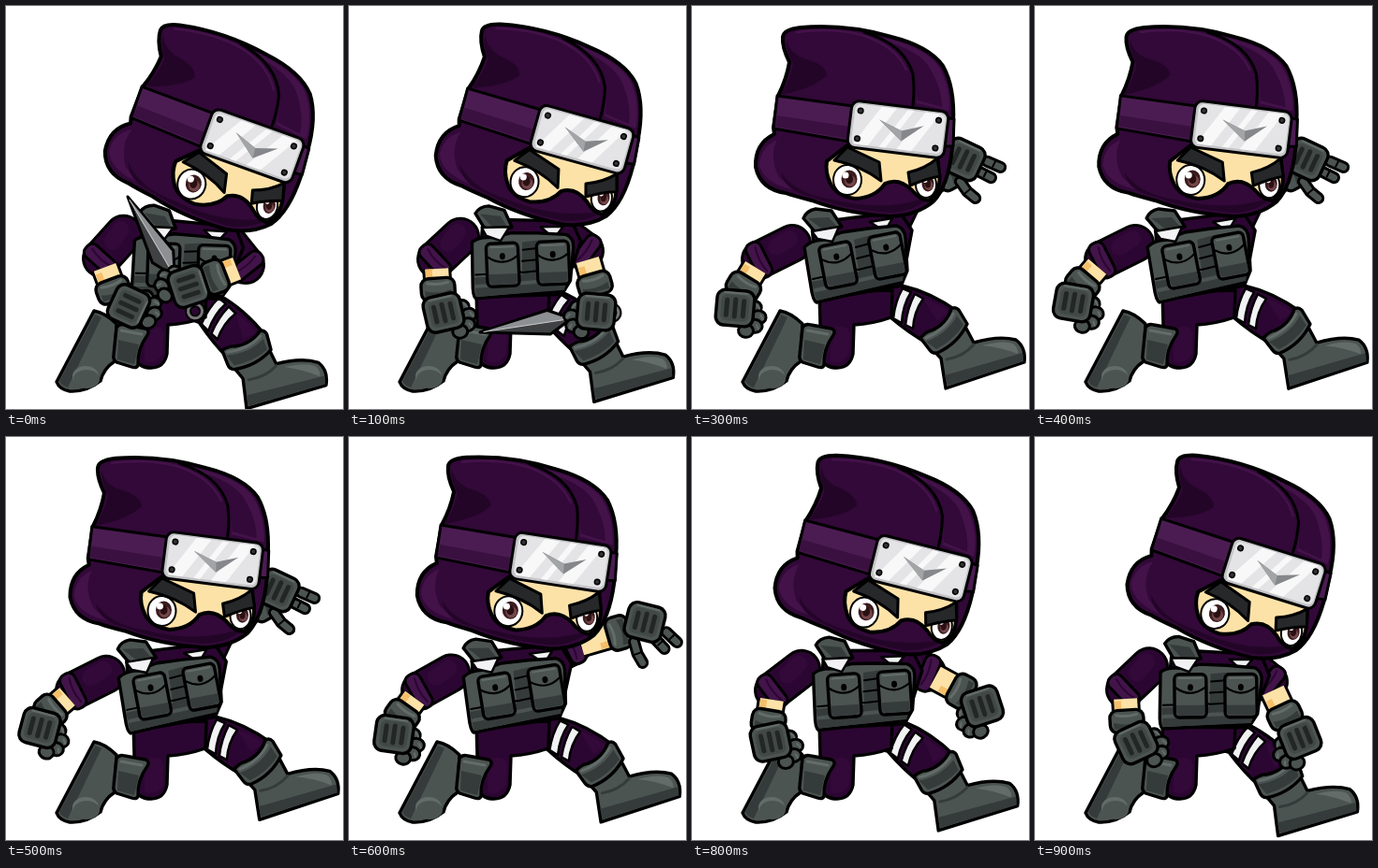
Animation, 360 px wide and 431 px high, one loop 1000 ms. Source, as an HTML page:

```html
<!DOCTYPE html>
<html lang="en">
<head>
<meta charset="utf-8">
<title>Ninja</title>
<style>
html, body { margin: 0; width: 100%; height: 100%; overflow: hidden; background: #fff; }
svg { display: block; width: 360px; height: 431px; }
</style>
</head>
<body>
<svg id="stage" viewBox="0 0 360 431"></svg>
<script>
const C = {
  hood: '#320938', deep: '#230528', lit: '#431249', band: '#4b1c52',
  cloth: '#2c0632', roll: '#42144a', skin: '#fde2a8',
  gray: '#4c5452', dark: '#353b3a', pale: '#636c69', white: '#f2f2f4'
};
const STEP = 100, HIP = '162 332';

// lean: degrees; arms: elbow, cuff, hand, pad angle, finger angle
const poses = [
  { lean: 12.8, near: [102, 270, 114, 302, 131, 321, 115, -20], far: [256, 277, 225, 289, 195, 300, 72, 38], knife: [130, 204, 59.5] },
  { lean: 8.5, near: [93, 271, 95, 301, 101, 328, -13, -10], far: [252, 262, 262, 296, 264, 327, 5, 5], knife: [140, 349, -8.5] },
  { lean: 3.7, near: [80, 271, 76, 302, 72, 331, -3, -3], far: [246, 238, 289, 244, 318, 254, 15, -100], knife: [294, 368, -78] },
  { lean: 0, near: [73, 271, 56, 299, 46, 323, 5, 6], far: [226, 205, 270, 180, 290, 164, 25, -40], open: 1 },
  { lean: .1, near: [73, 271, 52, 296, 41, 317, 10, 11], far: [226, 205, 270, 180, 290, 164, 25, -40], open: 1 },
  { lean: .2, near: [73, 271, 49, 292, 36, 311, 15, 16], far: [226, 205, 270, 180, 290, 164, 25, -40], open: 1 },
  { lean: 1.7, near: [76, 271, 58, 296, 48, 318, 8, 10], far: [238, 224, 286, 210, 316, 198, 14, -20], open: 1 },
  { lean: 3.7, near: [80, 271, 67, 299, 60, 322, 2, 4], far: [246, 233, 285, 233, 320, 230, 3, 0], open: 1 },
  { lean: 7.1, near: [87, 271, 82, 302, 84, 326, -12, -6], far: [251, 252, 286, 271, 310, 288, -18, -28] },
  { lean: 10.4, near: [96, 270, 98, 302, 108, 327, -25, -15], far: [250, 262, 266, 296, 283, 322, -22, -25] }
];

const shape = (d, fill, w = 3.4) =>
  `<path d="${d}" fill="${fill}" stroke="#000" stroke-width="${w}" stroke-linejoin="round"/>`;
const flat = (d, fill) => `<path d="${d}" fill="${fill}"/>`;
const line = (d, color, w, cap = 'round') =>
  `<path d="${d}" fill="none" stroke="${color}" stroke-width="${w}" stroke-linecap="${cap}"/>`;
const tube = (d, fill, w) => line(d, '#000', w + 6) + line(d, fill, w);
const oval = (x, y, rx, ry, fill, w = 0) =>
  `<ellipse cx="${x}" cy="${y}" rx="${rx}" ry="${ry}" fill="${fill}" stroke="#000" stroke-width="${w}"/>`;
const box = (x, y, w, h, r, fill, s = 3.4) =>
  `<rect x="${x}" y="${y}" width="${w}" height="${h}" rx="${r}" fill="${fill}" stroke="#000" stroke-width="${s}"/>`;
const group = (t, s) => `<g transform="${t}">${s}</g>`;
const angle = (x1, y1, x2, y2) => Math.atan2(y2 - y1, x2 - x1) * 180 / Math.PI;

function turn(x, y, deg) {
  const a = deg * Math.PI / 180, dx = x - 162, dy = y - 332;
  return [162 + dx * Math.cos(a) - dy * Math.sin(a), 332 + dx * Math.sin(a) + dy * Math.cos(a)];
}

function farLeg(k) {
  const boot =
    shape('M258 368L292 343L301 360Q328 352 346 357Q357 365 355 381L271 409L266 377Z', C.gray) +
    flat('M270 395L353 371L354 380L273 406Z', C.dark) +
    flat('M310 363Q332 357 343 361Q349 366 348 372Q330 365 310 363Z', C.pale) +
    line('M272 378Q290 375 301 362', C.dark, 3);
  const thigh =
    shape('M186 299L224 299Q255 306 284 327L252 361Q232 350 212 333L180 330Z', C.cloth) +
    flat('M246 312Q262 317 275 327L262 337Q254 324 246 312Z', C.hood) +
    shape('M225 302L234 306Q225 320 224 339L215 334Q217 316 225 302Z', C.white, 2.5) +
    shape('M238 308L247 313Q237 327 236 345L228 341Q230 323 238 308Z', C.white, 2.5) +
    shape('M244 355Q250 348 256 347Q272 340 277 324Q281 321 285 325L294 340Q284 361 262 371Q257 372 254 368Z', C.gray) +
    flat('M250 359Q273 350 283 331L290 341Q280 357 261 367Z', C.dark) +
    line('M250 355Q271 346 279 329', C.pale, 3);
  return group(`translate(${-13 * k} ${23 * k}) rotate(${2 * k} 310 380)`, boot) +
    group(`rotate(${16 * k} 190 315)`, thigh);
}

const nearLeg =
  shape('M94 326Q106 328 118 340L116 380Q104 388 101 401Q86 413 68 412Q57 410 54 402Z', C.gray) +
  flat('M95 330L102 333L66 408Q59 406 57 401Z', C.dark) +
  oval(85, 396, 14, 11, C.pale) + oval(86, 399, 14, 10, C.gray) +
  shape('M136 306L214 304L213 333Q193 340 173 341L172 372Q169 387 155 387Q142 387 138 377Z', C.cloth) +
  flat('M148 346Q164 338 169 350L168 372Q160 384 148 380Z', C.hood) +
  shape('M118 344Q121 339 127 341L149 345Q154 347 151 352Q140 367 141 384Q140 388 134 386L118 381Q114 378 115 373Z', C.gray) +
  flat('M120 357L142 362L137 383L119 378Z', C.dark) +
  line('M123 347L145 351', C.pale, 3);

const pocket = (t) => group(t,
  box(-17, -23, 34, 46, 5, C.gray) + flat('M-15 10H15V18Q14 21 10 21H-10Q-14 21 -15 18Z', C.dark) +
  line('M-16 -9Q-8 -3 0 -3Q8 -3 16 -9', '#000', 2.2) +
  line('M-12 -19H12', C.pale, 2) + oval(0, -9, 3, 3.6, '#000'));

const torso =
  shape('M128 232L222 220L235 240L224 299L134 315Z', C.cloth) +
  shape('M190 231L214 227L206 241Z', C.white, 2.5) +
  shape('M120 258Q126 251 140 250L160 242L188 238L218 235Q227 237 228 248L230 283L225 295L133 317Q129 315 127 300Z', C.gray) +
  flat('M128 295L228 274L225 294L133 315Z', C.dark) +
  line('M132 304L224 283', C.gray, 4) +
  line('M129 292L228 271', '#000', 2) +
  flat('M173 250L191 245L195 285L179 290Z', C.dark) +
  line('M175 258L190 254M176 270L192 266M178 282L194 278', '#000', 2) +
  pocket('translate(156 277) rotate(-11)') + pocket('translate(209 267) rotate(-11)') +
  shape('M119 227Q122 219 132 217L149 219L160 236L142 244L130 240Z', C.gray) +
  flat('M124 227L146 226L154 235L142 241Z', C.dark) +
  shape('M128 241L157 236L150 252L134 249Z', C.white, 2.5);

const hat =
  shape('M97 33Q98 25 116 23Q165 19 213 33Q253 43 268 64Q281 87 279 125L278 152Q274 192 258 209Q240 224 212 225Q165 222 128 208Q108 203 100 200Q73 196 68 172Q67 147 88 137L87 130L92 96Q101 78 104 60Q96 44 97 33Z', C.hood, 4) +
  flat('M101 36Q104 50 119 56Q143 62 144 74Q130 88 95 95Q106 76 108 62Q100 48 101 36Z', C.deep) +
  flat('M193 31Q248 42 263 64Q276 85 275 112L240 104Q243 64 193 31Z', C.lit) +
  flat('M197 35Q246 47 256 70Q267 90 267 108L241 101Q240 64 197 35Z', C.hood) +
  line('M184 28Q227 41 236 73Q238 90 236 106', '#000', 3) +
  line('M112 28Q150 23 181 31Q217 42 229 68', C.lit, 2.5) +
  flat('M72 170Q73 151 91 143Q82 162 93 183Q104 194 116 198Q77 192 72 170Z', C.lit) +
  flat('M95 178Q112 202 150 207Q210 222 258 202Q238 220 212 221Q160 217 128 204Q99 198 95 178Z', C.deep) +
  shape('M91 96L172 107L168 145L87 131Z', C.band, 3) +
  flat('M91 117L168 129L166 142L89 129Z', '#3a1040') +
  shape('M270 119L280 121L279 150L268 150Z', C.band, 3);

const face =
  shape('M144 166L166 149L262 160L264 178Q267 198 253 208Q243 207 235 197Q221 183 206 190Q196 205 174 206Q154 203 148 190Q142 178 144 166Z', C.skin, 4) +
  oval(166, 186, 15, 16, '#fff', 2) + oval(250, 191, 11, 14, '#fff', 2) +
  oval(168, 185, 8.5, 9.5, '#3a1c1e') + oval(169, 187, 6, 6, '#74464a') + oval(168, 185, 4, 5, '#2a1012') +
  oval(164, 181, 3.5, 3.5, '#fff') +
  oval(252, 190, 6.5, 8.5, '#3a1c1e') + oval(253, 192, 4.5, 5, '#74464a') + oval(252, 190, 3, 4.5, '#2a1012') +
  oval(249, 186, 2.5, 3, '#fff') +
  shape('M152 165L166 151L200 167L202 187Q181 171 152 165Z', '#26282a', 3) +
  shape('M231 178Q249 174 262 163L265 182Q252 184 233 192Z', '#26282a', 3);

const plate = group('translate(220 132) rotate(7)',
  box(-52, -25, 104, 50, 8, '#c4c4c8', 3) + box(-48, -22, 97, 43, 6, '#e4e4e6', 0) +
  flat('M-20 -22H-4L-30 21H-46ZM8 -22H15L-11 21H-18ZM27 -22H43L17 21H1Z', '#f8f8f9') +
  flat('M-21 -8L4 1L27 -7L5 12Z', '#85878a') + flat('M-21 -8L4 1L5 12Z', '#a2a4a6') +
  [[-42, -15], [42, -15], [-42, 15], [42, 15]].map(p => oval(...p, 2.8, 2.8, '#333', 1.5)).join(''));

const head = hat + face + plate;

function upperArm(sx, sy, ex, ey) {
  const a = angle(sx, sy, ex, ey);
  return tube(`M${sx} ${sy}L${ex} ${ey}`, C.cloth, 36) +
    line(`M${sx - 3} ${sy - 5}L${(sx + ex) / 2} ${(sy + ey) / 2 - 5}`, C.hood, 18) +
    group(`translate(${ex} ${ey}) rotate(${a})`,
      box(-7, -20, 17, 40, 7, C.roll, 3) + line('M-1 -14Q3 0 -1 14', C.cloth, 2));
}

function fingers(open, side) {
  if (open) return ['M-18 16L-19 29L-17 40', 'M4 20L10 34', 'M18 18L25 32']
    .map(d => tube(d, C.gray, 7)).join('') + line('M-23 29H-15M5 28L12 25M19 26L26 23', '#000', 2);
  return group(`scale(${side} 1)`,
    [[20, -3], [26, 7], [23, 17], [14, 23]].map(p => oval(...p, 8, 7, C.gray, 3)).join('') +
    line('M23 -6L26 -2M28 5L31 9M25 16L27 20', C.pale, 2));
}

const pad =
  box(-20, -19, 40, 38, 9, C.gray) +
  box(-15, -14, 30, 28, 6, '#414846', 0) +
  line('M-9 -8V8M0 -9V9M9 -8V8', '#222726', 5) +
  line('M-12 -16H12', C.pale, 2);

function foreArm([ex, ey, cx, cy, x, y, pr, fr], side, open) {
  const a = angle(ex, ey, cx, cy) - 90;
  const dx = cx - ex, dy = cy - ey, n = Math.hypot(dx, dy);
  const from = `${ex + dx / n * 10} ${ey + dy / n * 10}`;
  const skin = line(`M${from}L${cx} ${cy}`, '#000', 31, 'butt') +
    line(`M${from}L${cx} ${cy}`, C.skin, 25, 'butt') +
    group(`translate(${cx} ${cy}) rotate(${a})`, flat('M-12 -20H-5V0H-12Z', '#f6bf6a'));
  const cuff = group(`translate(${cx} ${cy}) rotate(${a})`,
    box(-18, -10, 36, 24, 8, C.gray) + line('M-11 -5Q0 -2 11 -5', C.pale, 3) +
    flat('M-14 3Q0 8 14 3V10H-14Z', C.dark));
  return skin + cuff +
    group(`translate(${x} ${y}) rotate(${fr})`, fingers(open, side)) +
    group(`translate(${x} ${y}) rotate(${pr})`, pad);
}

const blade =
  line('M90 0H134', '#222', 9) + line('M93 0H100', '#b01020', 7) +
  '<circle cx="142" r="7.5" fill="none" stroke="#000" stroke-width="7"/>' +
  '<circle cx="142" r="7.5" fill="none" stroke="#777" stroke-width="3"/>' +
  shape('M0 0L74 -13L93 -3V3L74 13Z', '#3f4142', 3) +
  flat('M3 0L74 -11L92 -2V0Z', '#8d9092') + line('M4 0H91', '#c8cacc', 1);

function figure(p) {
  const k = p.lean / 12.8;
  const lean = s => group(`rotate(${p.lean} ${HIP})`, s);
  const knife = p.knife
    ? group(`translate(${p.knife[0]} ${p.knife[1]}) rotate(${p.knife[2]})`, blade) : '';
  return farLeg(k) + nearLeg +
    upperArm(...turn(212, 234, p.lean), p.far[0], p.far[1]) +
    upperArm(...turn(107, 254, p.lean), p.near[0], p.near[1]) +
    lean(torso) + knife +
    foreArm(p.far, -1, p.open) + foreArm(p.near, 1) +
    lean(head);
}

const stage = document.getElementById('stage');
stage.innerHTML = poses.map(p => `<g display="none">${figure(p)}</g>`).join('');
const views = [...stage.children];
let shown = -1;

function draw() {
  const i = Math.floor(performance.now() / STEP) % views.length;
  if (i !== shown) {
    if (shown >= 0) views[shown].setAttribute('display', 'none');
    views[i].removeAttribute('display');
    shown = i;
  }
  requestAnimationFrame(draw);
}
draw();
</script>
</body>
</html>
```
